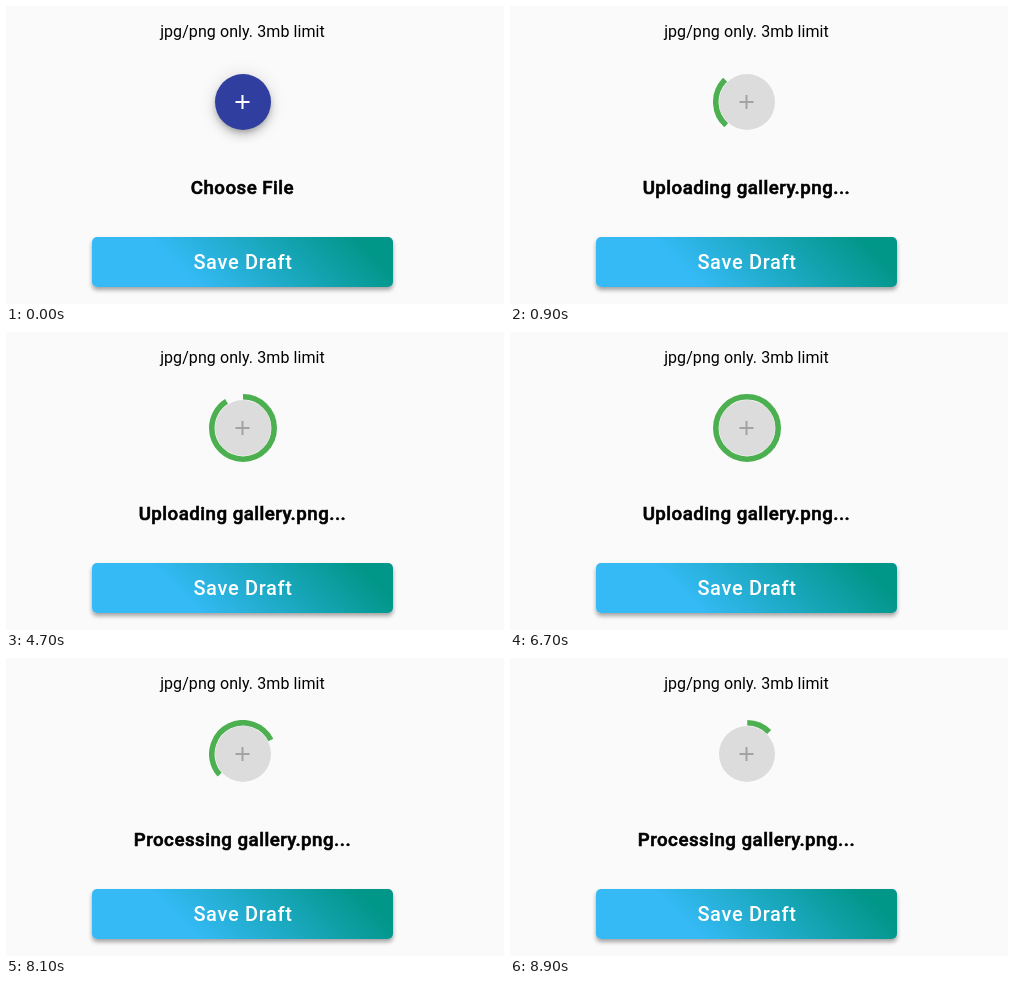
An HTML page for the animation above (9000 ms loop, 498x298 px).

```html
<!DOCTYPE html>
<html lang="en">
<head>
<meta charset="utf-8">
<title>Upload button</title>
<style>
  html, body { margin: 0; width: 100%; height: 100%; overflow: hidden; background: #fafafa; }
  body { position: relative; font-family: Roboto, sans-serif; color: #000; }
  body > * { position: absolute; }
  .line { left: 0; width: 473px; text-align: center; white-space: nowrap; }
  #hint { top: 14px; font-size: 16px; line-height: 24px; letter-spacing: .005em; }
  #status {
    top: 171px; font-size: 18.72px; line-height: 22px; font-weight: 500;
    letter-spacing: .025em; -webkit-text-stroke: .6px #000;
  }
  #fab {
    --k: 1;
    left: 209px; top: 68px; width: 56px; height: 56px; border-radius: 50%;
    background: color-mix(in srgb, rgb(48 63 159) calc(var(--k) * 100%), rgb(0 0 0 / .12));
    box-shadow:
      0 calc(3px * var(--k)) calc(5px * var(--k)) calc(-1px * var(--k)) rgb(0 0 0 / calc(.2 * var(--k))),
      0 calc(6px * var(--k)) calc(10px * var(--k)) rgb(0 0 0 / calc(.14 * var(--k))),
      0 calc(1px * var(--k)) calc(18px * var(--k)) rgb(0 0 0 / calc(.12 * var(--k)));
  }
  #fab svg { position: absolute; left: 16px; top: 16px; fill: currentColor; }
  #spinner { left: 203px; top: 62px; }
  #save {
    left: 86px; top: 231px; width: 301px; height: 50px; border-radius: 5px;
    background: linear-gradient(45deg, #35baf6 30%, #009688 90%);
    box-shadow: 0 3px 4px rgb(0 0 0 / .35);
    color: #fff; text-align: center; text-indent: 1px; font-size: 20px; font-weight: 500;
    line-height: 50px; letter-spacing: .033em;
  }
</style>
</head>
<body>
<div id="hint" class="line">jpg/png only. 3mb limit</div>
<div id="fab"><svg width="24" height="24"><path d="M18.5 13h-6v6h-2v-6h-6v-2h6V5h2v6h6z"/></svg></div>
<svg id="spinner" width="68" height="68" viewBox="22 22 44 44">
  <circle id="ring" cx="44" cy="44" r="20.2" fill="none" stroke="#4caf50" stroke-width="3.6"/>
</svg>
<div id="status" class="line"></div>
<div id="save">Save Draft</div>
<script>
const LOOP = 9000, STEP = 100;
const UPLOAD = 600, FIRST_PROGRESS = 700, PROCESS = 7700;
const CIRCUMFERENCE = 2 * Math.PI * 20.2;
const [fab, spinner, ring, statusLine] =
  ['fab', 'spinner', 'ring', 'status'].map(id => document.getElementById(id));

const clamp = x => Math.min(1, Math.max(0, x));
const mix = (a, b, k) => a + (b - a) * k;

// Timing curve whose control points lie at heights 0 and 1.
function ease(x, x1, x2) {
  let lo = 0, hi = 1;
  for (let i = 0; i < 30; i++) {
    const u = (lo + hi) / 2, v = 1 - u;
    if (3 * v * v * u * x1 + 3 * v * u * u * x2 + u ** 3 < x) lo = u; else hi = u;
  }
  return lo * lo * (3 - 2 * lo);
}

function setRing(angle, dash, gap, offset) {
  ring.setAttribute('transform', `rotate(${angle} 44 44)`);
  ring.setAttribute('stroke-dasharray', `${dash} ${gap}`);
  ring.setAttribute('stroke-dashoffset', offset);
}

function showProgress(percent) {
  const turn = 1 - (1 - clamp(percent / 70)) ** 3;
  setRing(turn * 270, CIRCUMFERENCE, CIRCUMFERENCE, (1 - percent / 100) ** 2 * CIRCUMFERENCE);
}

function showSpin(ms) {
  const p = ms / 1400 % 1;
  const k = ease(p * 2 % 1, .42, .58);
  if (p < .5) setRing(p * 360, mix(1, 100, k), 200, -15 * k);
  else setRing(p * 360, 100, 200, mix(-15, -125, k));
}

function draw(now) {
  const t = Math.floor(now % LOOP / STEP) * STEP;
  const busy = t >= UPLOAD, processing = t >= PROCESS;

  statusLine.textContent = !busy ? 'Choose File'
    : (processing ? 'Processing' : 'Uploading') + ' gallery.png...';
  fab.style.setProperty('--k', 1 - ease(clamp((t - 580) / 250), .4, .2));
  fab.style.color = busy ? 'rgb(0 0 0 / .26)' : '#fff';

  spinner.style.display = t >= FIRST_PROGRESS ? '' : 'none';
  if (processing) showSpin(t - PROCESS + 26);
  else showProgress(14 * Math.max(0, Math.floor((t - FIRST_PROGRESS) / 1000) + 1));
}

const start = performance.now();
function tick() {
  draw(performance.now() - start);
  requestAnimationFrame(tick);
}
tick();
</script>
</body>
</html>
```
